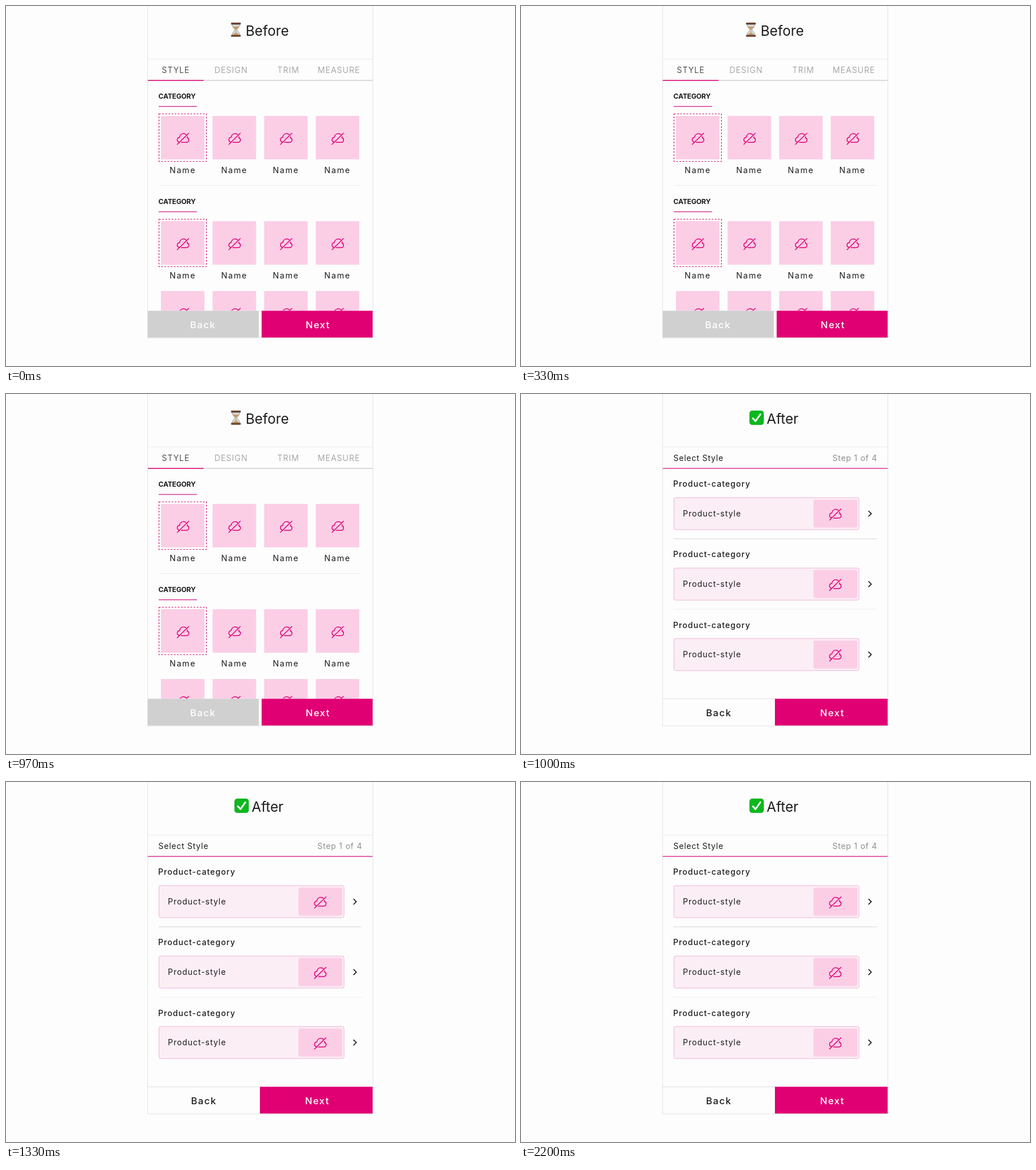
These frames come from a looping animation (890 px wide and 629 px high, 2660 ms). An HTML page:

```html
<!DOCTYPE html>
<html lang="en">
<head>
<meta charset="utf-8">
<title>Before and after</title>
<style>
  html, body { margin: 0; width: 100%; height: 100%; overflow: hidden; background: #fdfdfd; }
  svg { display: block; width: 890px; height: 629px; font-family: Inter, "Open Sans", sans-serif; }
  text { font-size: 14px; fill: #1c1c1c; white-space: pre; }
  .title { font-size: 24.2px; }
  .tab { letter-spacing: 1.1px; font-weight: 300; }
  .heading { font-size: 12px; font-weight: 700; letter-spacing: -.15px; }
  .name { font-size: 14.2px; letter-spacing: 1.7px; }
  .step { letter-spacing: .75px; }
  .label { font-weight: 500; letter-spacing: 1.05px; }
  .style { letter-spacing: .95px; }
  .button { font-size: 16.5px; font-weight: 500; letter-spacing: 1.5px; }
  .muted { fill: #8f8f8f; }
  .white { fill: #fff; }
</style>
</head>
<body>
<svg viewBox="0 0 890 629">
  <defs>
    <g id="cloud" fill="none" stroke="#e00074" stroke-width="1.5" stroke-linecap="round" stroke-linejoin="round">
      <path d="M-6.3 6.3C-9 6-10.3 4-10 1.8C-9.7-.6-8.2-2-6-2C-5.5-6-2.6-8.5.8-8.5C2.8-8.5 4.4-7.8 5.5-6.8"/>
      <path d="M7.6-3.2C7.8-2.4 7.6-1.6 7.4-1C9.2-.6 10.3.8 10.2 2.8C10 5.2 8.2 6.8 5.6 6.8H-3"/>
      <path d="M-10 10.3L10-9.3"/>
    </g>
    <clipPath id="view"><rect x="248" y="131" width="393" height="401.5"/></clipPath>
  </defs>
  <g id="before"></g>
  <g id="after"></g>
  <path d="M247.5 0V580H641.5V0" fill="none" stroke="#e2e2e4"/>
  <path d="M248 92.5H641" stroke="#ebebeb"/>
</svg>
<script>
const PINK = '#e00074', PALE = '#fbcee6';
const LOOP = 2660, SWITCH = 1000;
const before = document.getElementById('before');
const after = document.getElementById('after');

const text = (x, y, cls, str) => `<text x="${x}" y="${y}" class="${cls}">${str}</text>`;
const rect = (x, y, w, h, fill, more = '') =>
  `<rect x="${x}" y="${y}" width="${w}" height="${h}" fill="${fill}" ${more}/>`;
const line = (x1, x2, y, color, width = 1) =>
  `<path d="M${x1} ${y}H${x2}" stroke="${color}" stroke-width="${width}"/>`;
const cloud = (x, y) => `<use href="#cloud" x="${x}" y="${y}"/>`;
const repeat = (n, fn) => Array.from({ length: n }, (_, i) => fn(i)).join('');

const tiles = y => repeat(4, i => {
  const x = 271 + i * 90.2;
  return rect(x, y, 76, 76, PALE) + cloud(x + 38.5, y + 39.5) + text(x + 15, y + 100, 'name', 'Name');
});

const category = y =>
  text(266.5, y + 162, 'heading', 'CATEGORY') +
  line(267, 334, y + 175.5, '#d8389a', 1.3) +
  rect(267.5, y + 188.5, 83, 83, 'none', `stroke="#d0106e" stroke-width="1.2" stroke-dasharray="3 2.5"`) +
  tiles(y + 192);

const hourglass = `
  <path d="M395 31C395 38 400 39 400 41.5S395 45 395 52H409C409 45 404 44 404 41.5S409 38 409 31Z"
    fill="#d5dadd" stroke="#8c9296" stroke-width=".8"/>
  <path d="M396.5 36H407.5C406.5 39 403 40 402 42C401 40 397.5 39 396.5 36ZM396 51.5C397 48.5 400 48 402 46C404 48 407 48.5 408 51.5Z"
    fill="#c99b63"/>
  <path d="M402 41V48" stroke="#c99b63"/>` +
  rect(393.5, 29, 17, 3.4, '#6a4430', 'rx="1.2"') +
  rect(393.5, 50.4, 17, 3.4, '#6a4430', 'rx="1.2"');

before.innerHTML =
  hourglass + text(419, 52, 'title', 'Before') +
  text(272.5, 117, 'tab', 'STYLE') +
  text(364.5, 117, 'tab muted', 'DESIGN') +
  text(474.5, 117, 'tab muted', 'TRIM') +
  text(545, 117, 'tab muted', 'MEASURE') +
  line(248, 641, 130, '#cfcfd4', 1.3) + line(248, 345.5, 130, PINK, 1.5) +
  `<g clip-path="url(#view)">${category(0)}${line(267, 621, 313.5, '#ececea')}${category(184)}${tiles(498)}</g>` +
  rect(248, 532.5, 194, 47, '#d0d0d0') + rect(447, 532.5, 194, 47, PINK) +
  text(322, 563, 'button white', 'Back') + text(524, 563, 'button white', 'Next');

const card = i => {
  const y = i * 123.1;
  return text(266, y + 162.3, 'label', 'Product-category') +
    rect(267.5, y + 181, 323.5, 56, '#fbeef5', 'rx="3" stroke="#f0b4d6"') +
    rect(511.5, y + 184.5, 76.5, 49, PALE, 'rx="3"') +
    text(283, y + 214, 'style', 'Product-style') +
    cloud(549.5, y + 210) +
    `<path d="M607.5 ${y + 204.2}l5 4.9l-5 4.9" fill="none" stroke="#111" stroke-width="1.6"/>`;
};

after.innerHTML =
  rect(399.8, 29.3, 24.4, 24.4, '#0cb81e', 'rx="4.5" stroke="#079a16" stroke-width=".6"') +
  '<path d="M405.5 42.5L410 47.5L418.5 35.5" fill="none" stroke="#fff" stroke-width="3" stroke-linecap="round" stroke-linejoin="round"/>' +
  text(429.5, 52, 'title', 'After') +
  text(266.5, 117, 'step', 'Select Style') + text(544.5, 117, 'step muted', 'Step 1 of 4') +
  line(248, 641, 130, '#e2309a', 1.6) +
  repeat(3, card) +
  line(267, 622, 253, '#d4d4d6') + line(267, 622, 376, '#ececec') +
  line(248, 444, 532.5, '#e2e2e4') + rect(444, 532.5, 197, 47, PINK) +
  text(323.5, 563, 'button', 'Back') + text(523, 563, 'button white', 'Next');

const start = performance.now();
function draw() {
  const early = (performance.now() - start) % LOOP < SWITCH;
  before.style.display = early ? '' : 'none';
  after.style.display = early ? 'none' : '';
  requestAnimationFrame(draw);
}
draw();
</script>
</body>
</html>
```
